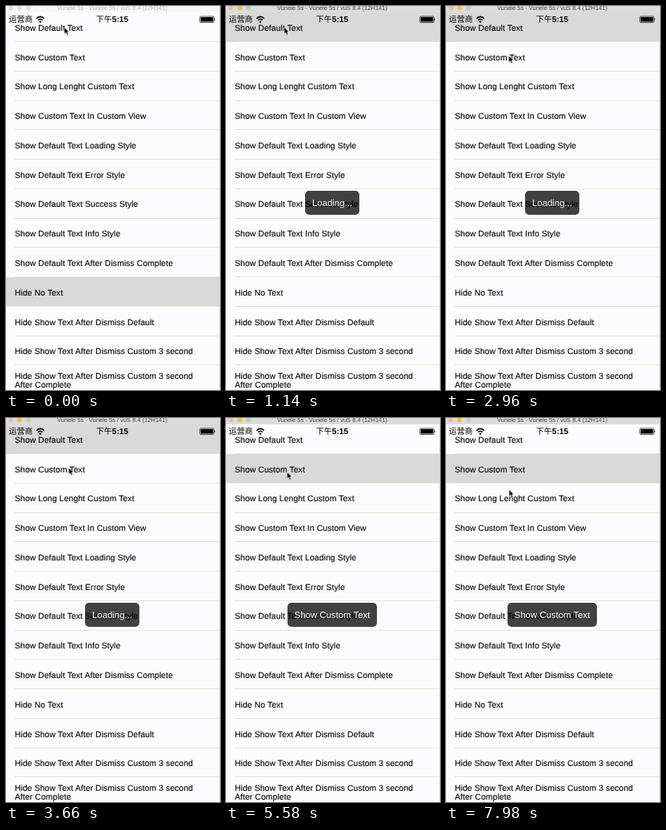
Recreate the animation shown at these times as an HTML page. Size 268 by 480 pixels, loop 8 s.

```html
<!DOCTYPE html>
<html lang="en">
<head>
<meta charset="utf-8">
<title>Toast list</title>
<style>
  html, body { margin: 0; width: 100%; height: 100%; overflow: hidden; background: #fcfcfe; }
  svg { display: block; width: 100vw; height: 100vh; }
  text { font-family: "Liberation Sans", Arial, sans-serif; text-rendering: geometricPrecision; }
  .row { font-size: 10.4px; letter-spacing: .09px; fill: #060606; stroke: #060606; stroke-width: .12px; }
  .status { font: 10px "Noto Sans CJK SC", "Noto Sans CJK", "Noto Sans CJK JP", sans-serif; }
  .digits { font: bold 10.2px "Liberation Sans", Arial, sans-serif; }
  .title { font-size: 7.5px; text-anchor: middle; }
  .toast rect { fill: rgba(0, 0, 0, .74); }
  .toast text { font-size: 11.4px; fill: #fff; text-anchor: middle; }
  .mark { fill: #d9d9d9; }

  .before, .first, .second, .active { animation: 8s step-end infinite; }
  .before { animation-name: before; }
  .active { animation-name: active; }
  .first { animation-name: first; }
  .second { animation-name: second; }
  .loading { animation: loading 8s linear infinite; }
  .custom { animation: custom 8s linear infinite; }
  .cursor { animation: move 8s ease-in-out infinite; }

  @keyframes before { 0% { opacity: 1 } 5%, 100% { opacity: 0 } }
  @keyframes active { 0% { opacity: 0 } 5%, 100% { opacity: 1 } }
  @keyframes first { 0% { opacity: 0 } 5% { opacity: 1 } 67.5%, 100% { opacity: 0 } }
  @keyframes second { 0% { opacity: 0 } 67.5%, 100% { opacity: 1 } }
  @keyframes loading {
    0%, 5.5% { opacity: 0 }
    8.5%, 67.5% { opacity: 1 }
    67.51%, 100% { opacity: 0 }
  }
  @keyframes custom {
    0%, 67.5% { opacity: 0 }
    69.5%, 100% { opacity: 1 }
  }
  @keyframes move {
    0%, 25% { transform: translate(73px, 26.5px) }
    28.2% { transform: translate(73.5px, 32.5px) }
    36%, 46% { transform: translate(78.5px, 62px) }
    55%, 63.5% { transform: translate(77px, 64px) }
    66%, 93% { transform: translate(76.5px, 67.5px) }
    99%, 100% { transform: translate(79px, 89.5px) }
  }
</style>
</head>
<body>
<svg viewBox="0 0 268 480" preserveAspectRatio="none">
  <rect width="268" height="480" fill="#fcfcfe"/>
  <rect class="mark before" y="339" width="268" height="36.5"/>
  <rect class="mark first" y="8" width="268" height="37"/>
  <rect class="mark second" y="45" width="268" height="36.5"/>
  <g id="list"></g>

  <g class="before">
    <rect width="268" height="8" fill="#f7f7f7"/>
    <g fill="#dededa">
      <circle cx="6" cy="2.5" r="3"/><circle cx="17" cy="2.5" r="3"/><circle cx="28" cy="2.5" r="3"/>
    </g>
    <text class="title" x="133" y="4.5" fill="#b4b4b0">Vunele 5s - Vunele 5s / vuS 8.4 (12H141)</text>
  </g>
  <g class="active">
    <rect width="268" height="8" fill="#dcdcdc"/>
    <circle cx="6" cy="2.5" r="3" fill="#e4c0ae"/>
    <circle cx="17" cy="2.5" r="3" fill="#f4c03c"/>
    <circle cx="28" cy="2.5" r="3" fill="#c4cda8"/>
    <text class="title" x="133" y="4.5" fill="#404040">Vunele 5s - Vunele 5s / vuS 8.4 (12H141)</text>
  </g>

  <text class="status" x="3.5" y="20.3">运营商</text>
  <g fill="none" stroke="#000" stroke-width="1.5">
    <path d="M38.3 15.6Q43 11.2 47.7 15.6M40.2 17.7Q43 15.2 45.8 17.7"/>
    <path d="M43 18.5L44.6 19.5L43 21.2L41.4 19.5Z" fill="#000" stroke="none"/>
  </g>
  <text class="status" x="133" y="20.3" text-anchor="middle">下午<tspan class="digits">5:15</tspan></text>
  <rect x="242.8" y="13" width="17.6" height="7.6" rx="1.2" fill="none" stroke="#000" stroke-width=".7"/>
  <rect x="243.8" y="14" width="15.6" height="5.6" rx=".6"/>
  <path d="M261.3 15.3Q263 16.8 261.3 18.3Z"/>

  <g class="toast loading">
    <rect x="99" y="231" width="68" height="30" rx="5"/>
    <text x="133" y="249.5">Loading...</text>
  </g>
  <g class="toast custom">
    <rect x="77" y="231" width="112" height="30" rx="5"/>
    <text x="133" y="249.5">Show Custom Text</text>
  </g>

  <path d="M267.5 0V480" stroke="#dededc" stroke-width=".8"/>
  <path class="cursor" d="M0 0V8.4L2 6.7L3.4 9.9L5 9.2L3.6 6.1H6Z" stroke="#fff" stroke-width=".6"/>
</svg>
<script>
  const labels = [
    "Show Default Text",
    "Show Custom Text",
    "Show Long Lenght Custom Text",
    "Show Custom Text In Custom View",
    "Show Default Text Loading Style",
    "Show Default Text Error Style",
    "Show Default Text Success Style",
    "Show Default Text Info Style",
    "Show Default Text After Dismiss Complete",
    "Hide No Text",
    "Hide Show Text After Dismiss Default",
    "Hide Show Text After Dismiss Custom 3 second"
  ];
  const pitch = 36.77;
  const list = document.getElementById("list");

  function add(tag, attrs, text = "") {
    const node = document.createElementNS("http://www.w3.org/2000/svg", tag);
    for (const key in attrs) node.setAttribute(key, attrs[key]);
    node.textContent = text;
    list.append(node);
  }
  const addLabel = (text, y) => add("text", { class: "row", x: 11, y }, text);

  labels.forEach((label, i) => {
    addLabel(label, 30.8 + i * pitch);
    const y = Math.round(44 + i * pitch);
    add("rect", { x: 11, y, width: 257, height: 1, fill: "#e6e6de" });
  });
  addLabel("Hide Show Text After Dismiss Custom 3 second", 465.8);
  addLabel("After Complete", 477.3);
</script>
</body>
</html>
```
